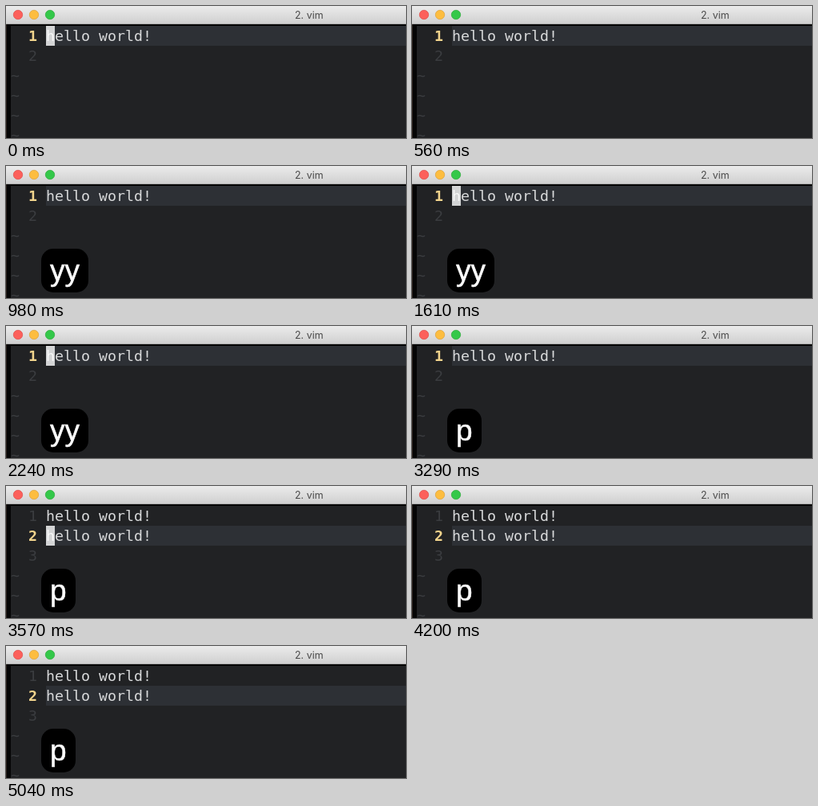
An HTML page for the animation above (5.11 s loop, 500x166 px).

```html
<!DOCTYPE html>
<html lang="en">
<head>
<meta charset="utf-8">
<title>Vim: yank and put</title>
<style>
  html, body { margin: 0; width: 100%; height: 100%; overflow: hidden; background: #212224; }
  svg { display: block; width: 500px; height: 166px; }
  .mono { font: 18.27px "DejaVu Sans Mono", monospace; white-space: pre; }
  .code { fill: #d8d9da; }
  .dim { fill: #3b3d40; }
  .current { fill: #f3d58d; font-weight: bold; }
  .title { font: 12.5px Inter, sans-serif; fill: #4b4b4b; }
  .key { font: 37px "Liberation Sans", sans-serif; fill: #fff; stroke: #fff; stroke-width: .5; }
</style>
</head>
<body>
<svg viewBox="0 0 500 166">
  <defs>
    <linearGradient id="chrome" x2="0" y2="1">
      <stop stop-color="#ebebeb"/>
      <stop offset="1" stop-color="#d0d0d0"/>
    </linearGradient>
  </defs>
  <rect width="500" height="166" fill="#050505"/>
  <rect y="23" width="1" height="143" fill="#2b211d"/>
  <rect x="6" y="25" width="494" height="141" fill="#212224"/>
  <rect width="500" height="22" fill="url(#chrome)"/>
  <rect y="22" width="500" height="1" fill="#aaa"/>
  <g stroke-width=".7">
    <circle cx="15" cy="11" r="5.7" fill="#fc605b" stroke="#df4744"/>
    <circle cx="35" cy="11" r="5.7" fill="#fdbd40" stroke="#de9f34"/>
    <circle cx="55" cy="11" r="5.7" fill="#34c84a" stroke="#27aa35"/>
  </g>
  <text class="title" x="361" y="16">2. vim</text>
  <rect id="line" x="50" y="25" width="450" height="25" fill="#2d3035"/>
  <g id="rows"></g>
  <g id="cursor">
    <rect x="50" y="25" width="11" height="25" fill="#d3d4d5"/>
    <text class="mono" x="50" y="44" fill="#f8f8f8">h</text>
  </g>
  <g id="bezel">
    <rect id="box" x="44" y="104" height="55" rx="15"/>
    <text id="key" class="key" x="55" y="144"></text>
  </g>
</svg>
<script>
const LOOP = 5110, BLINK = 560, ROW = 25, PUT = 3360;
// time, keys, bezel width, opacity
const keys = [
  [0, "", 0, 0],
  [770, "y", 41, 1],
  [910, "yy", 59, 1],
  [3080, "yy", 59, .7],
  [3150, "yy", 59, .4],
  [3220, "yy", 59, .12],
  [3290, "p", 43, 1]
];
const el = id => document.getElementById(id);
const [line, rows, cursor, bezel, box, key] =
  ["line", "rows", "cursor", "bezel", "box", "key"].map(el);

const label = (text, x, row, style) =>
  `<text class="mono ${style}" x="${x}" y="${44 + row * ROW}">${text}</text>`;

function buffer(lines) {
  const current = lines - 1;
  let out = "";
  for (let i = 0; i < 6; i++) {
    if (i > lines) { out += label("~", 6, i, "dim"); continue; }
    out += label(i + 1, 28, i, i === current ? "current" : "dim");
    if (i < lines) out += label("hello world!", 50, i, "code");
  }
  return out;
}

let shownLines = 0;
function draw(t) {
  const lines = t < PUT ? 1 : 2;
  if (lines !== shownLines) {
    rows.innerHTML = buffer(lines);
    const shift = `translate(0 ${(lines - 1) * ROW})`;
    line.setAttribute("transform", shift);
    cursor.setAttribute("transform", shift);
    shownLines = lines;
  }
  cursor.setAttribute("visibility", Math.floor(t / BLINK) % 2 ? "hidden" : "visible");

  const [, text, width, opacity] = keys.findLast(step => step[0] <= t);
  key.textContent = text;
  box.setAttribute("width", width);
  bezel.setAttribute("opacity", opacity);
}

const start = performance.now();
function tick() {
  draw((performance.now() - start) % LOOP);
  requestAnimationFrame(tick);
}
tick();
</script>
</body>
</html>
```
